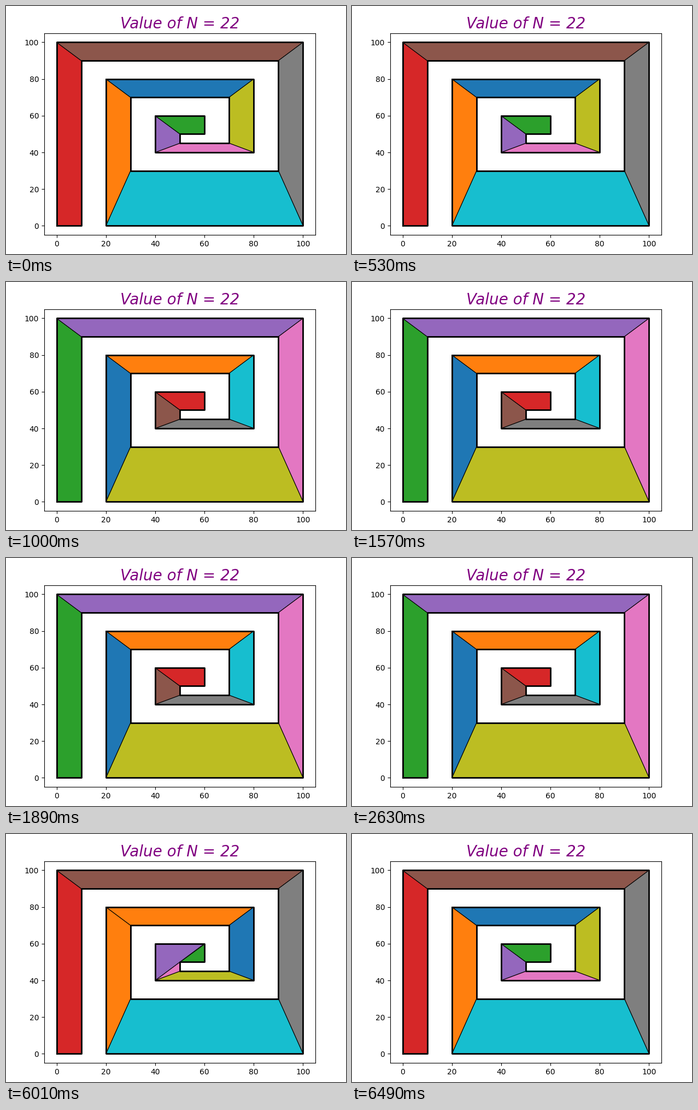
Animation of 622x454 px, one loop 8000 ms. Source, as a matplotlib script:

```python
import matplotlib.pyplot as plt
from matplotlib.animation import FuncAnimation
from matplotlib.collections import PolyCollection

W, H, DPI = 622, 454, 100
LOOP, STEP = 8000, 20


def spiral(x, y, lengths):
    """Walk up, right, down, left, up, ... and return the corners."""
    points = [(x, y)]
    for i, length in enumerate(lengths):
        step = length if i % 4 < 2 else -length
        if i % 2:
            x += step
        else:
            y += step
        points.append((x, y))
    return points


# The two walls of the corridor, from its mouth to its centre
outer = spiral(0, 0, [100, 100, 100, 80, 80, 60, 40, 40, 20, 20])
inner = spiral(10, 0, [90, 80, 60, 60, 40, 40, 25, 20, 5, 10])
wall = outer + inner[::-1] + outer[:1]

quads = [[outer[i], outer[i + 1], inner[i + 1], inner[i]] for i in range(10)]
# Alternative cut of the innermost part along one long diagonal
split = quads[:8] + [
    [outer[8], inner[8], inner[9]],
    [*outer[8:], inner[9]],
    [outer[10], inner[10], inner[9]],
]

# Odd colours of the cycle going up, then the even ones going down
colors = [f"C{(3 + 2 * i) % 10}" for i in range(5)]
colors += [f"C{-2 * i % 10}" for i in range(5)]
ends_swapped = colors[-1:] + colors[1:-1] + colors[:1]

TIMELINE = [
    (0, quads, colors),
    (890, quads, ends_swapped),
    (1000, quads, colors[::-1]),
    (5980, split, colors[:5] + colors[4:]),
    (6490, quads, colors),
]

fig = plt.figure(figsize=(W / DPI, H / DPI), dpi=DPI)
ax = fig.add_axes([70 / W, 34.8 / H, 496 / W, 369.6 / H])
ax.set(xlim=(-5, 105), ylim=(-5, 105))
ax.set_title("Value of N = 22", fontsize=20, style="italic", color="purple")

pieces = PolyCollection([], edgecolors="black", linewidths=0.8)
ax.add_collection(pieces, autolim=False)
ax.plot(*zip(*wall), color="black", lw=2)


def update(frame):
    t = (frame + 0.5) * STEP
    _, shapes, fills = [state for state in TIMELINE if state[0] <= t][-1]
    pieces.set_verts(shapes)
    pieces.set_facecolor(fills)
    return [pieces]


anim = FuncAnimation(fig, update, frames=LOOP // STEP, interval=STEP,
                     repeat=True, repeat_delay=0)
plt.show()
```
